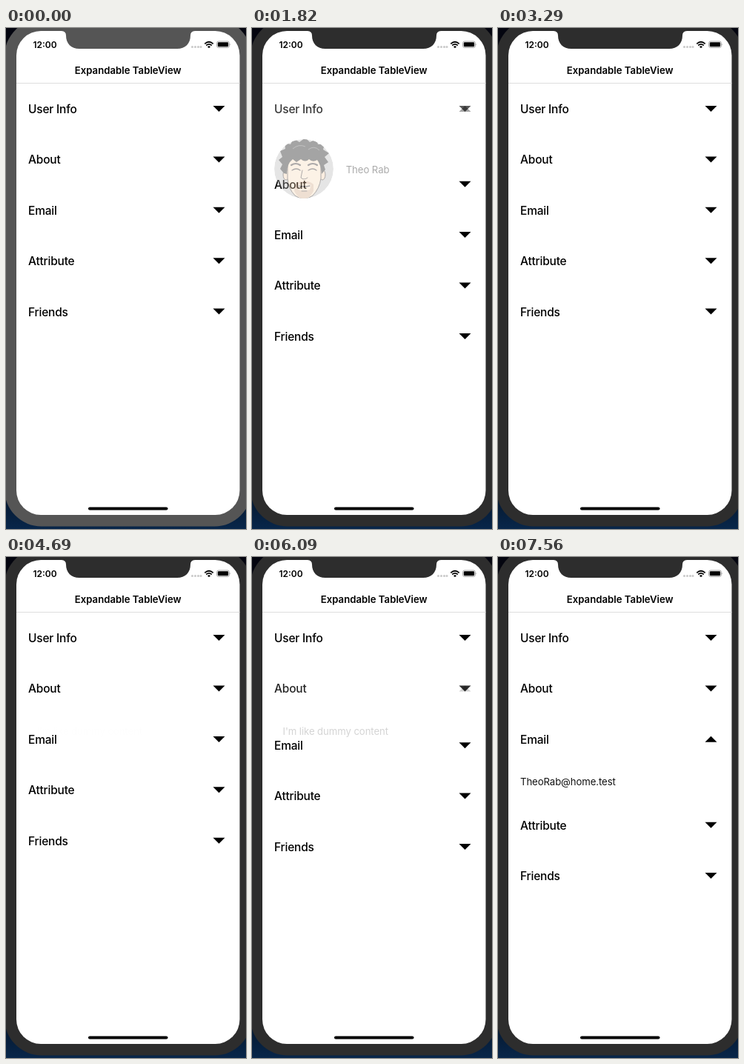
Animation, 324 px wide and 676 px high, one loop 8 s. Source, as an HTML page:

```html
<!DOCTYPE html>
<html lang="en">
<head>
<meta charset="utf-8">
<title>Expandable TableView</title>
<style>
  html, body { margin: 0; width: 100%; height: 100%; overflow: hidden; background: #050812; }
  svg { display: block; width: 324px; height: 676px; font-family: Inter, "Liberation Sans", sans-serif; }
  .title { font-size: 13.2px; font-weight: 600; text-anchor: middle; }
  .clock { font-size: 12px; font-weight: 600; text-anchor: middle; }
  .head { font-size: 15.5px; font-weight: 500; letter-spacing: -.2px; }
  .body { font-size: 13.2px; letter-spacing: -.1px; fill: #111; }
  .bezel { fill: #555; }
  .dim .bezel { fill: #2d2d2d; }
</style>
</head>
<body>
<svg id="stage" viewBox="0 0 324 676">
  <defs>
    <linearGradient id="sky" x2="0" y2="1">
      <stop offset="0" stop-color="#04050f"/>
      <stop offset=".9" stop-color="#03101f"/>
      <stop offset="1" stop-color="#08264a"/>
    </linearGradient>
    <clipPath id="disc"><circle cx="70" cy="190" r="40"/></clipPath>
  </defs>
  <rect width="324" height="676" fill="url(#sky)"/>
  <rect class="bezel" x="-2" y="-12" width="333.5" height="684.5" rx="50"/>
  <rect x="14" y="4" width="301.5" height="653" rx="33" fill="#fff"/>
  <path class="bezel" d="M75 3V4Q81 4.500 81 10C81 21 88 28 99 28H231C242 28 249 21 249 10Q249 4.500 255 4V3Z"/>

  <text class="clock" x="52.500" y="26.800">12:00</text>
  <g fill="#c9c9c9">
    <circle cx="251.500" cy="25.500" r="1.500"/><circle cx="255.500" cy="25.500" r="1.500"/>
    <circle cx="259.500" cy="25.500" r="1.500"/><circle cx="263" cy="25.500" r="1.500"/>
  </g>
  <g fill="none" stroke="#000" stroke-width="1.700">
    <path d="M268.300 21.300Q274 16.200 279.700 21.300"/>
    <path d="M270.300 23.500Q274 20.200 277.700 23.500"/>
  </g>
  <path d="M272 25.200Q274 23.500 276 25.200L274 27.200Z"/>
  <rect x="284.500" y="18" width="17" height="8.500" rx="2.500" fill="none" stroke="#999" stroke-width=".8"/>
  <rect x="285.800" y="19.300" width="14.400" height="5.900" rx="1.300"/>
  <path d="M302.500 20.800Q304 22.200 302.500 23.700Z" fill="#999"/>

  <text class="title" x="164.700" y="62">Expandable TableView</text>
  <rect x="14" y="74" width="301.500" height="1" fill="#dedede"/>
  <rect x="111" y="646.500" width="107.500" height="4" rx="2"/>

  <g id="rows"></g>

  <g class="panel">
    <g clip-path="url(#disc)">
      <circle cx="70" cy="190" r="40" fill="#b6b6b6"/>
      <g stroke="#1a1210" stroke-width="1">
        <ellipse cx="46" cy="198" rx="4" ry="7" fill="#f3cfa8"/>
        <ellipse cx="95" cy="198" rx="4" ry="7" fill="#f3cfa8"/>
        <path fill="#f8dcb9" d="M48 176Q70 164 93 176L93 203Q91 217 82 226Q70 235 58 226Q49 217 48 203Z"/>
      </g>
      <path d="M43 196L38 190L41 184L36 178L41 174L38 166L45 163L44 155L52 157L56 149L64 154L72 148L78 154L87 150L89 157L98 157L96 164L104 169L98 174L103 181L97 185L99 191L94 197Q93 184 88 178Q82 182 77 177Q72 182 66 177L60 181L55 177Q47 183 47 197Z"/>
      <path d="M55 163Q63 156 72 160M76 164Q84 158 91 165" fill="none" stroke="#555" stroke-width="1"/>
      <path fill="#d0a682" d="M58 211Q65 205 70 208Q76 205 83 211L83 220Q78 230 70 231Q62 230 57 220Z"/>
      <path fill="#f8dcb9" d="M61 212Q70 207 80 212L78 218Q70 221 62 218Z"/>
      <g fill="none" stroke="#1a1210" stroke-linecap="round">
        <path stroke-width="2.200" d="M53 185Q59 181 65 185M76 185Q82 181 88 185"/>
        <path stroke-width="1.300" d="M54 192Q60 188 65 192M76 192Q82 188 87 192M63 213Q70 215 78 213"/>
        <path stroke-width="1" d="M68 192L66 202Q70 206 75 202M67 220H74"/>
      </g>
    </g>
    <text class="body" x="126.700" y="195.500">Theo Rab</text>
  </g>
  <text class="panel body" x="41.500" y="240.300">I'm like dummy content</text>
  <text class="panel body" x="30" y="308.300">TheoRab@home.test</text>
</svg>
<script>
  const LOOP = 8000, TICK = 70, FADE = 300, DIM_AT = 1540;
  const FIRST_ROW = 109, PITCH = 68.4;
  const NAMES = ["User Info", "About", "Email", "Attribute", "Friends"];
  // One section per panel: opening time, closing time, panel height
  const SECTIONS = [
    { open: 1700, close: 2905, height: 94.6 },
    { open: 4680, close: 5870, height: 47.5 },
    { open: 7200, close: Infinity, height: 47.5 }
  ];

  const stage = document.getElementById("stage");
  const panels = [...document.querySelectorAll(".panel")];
  const rowsBox = document.getElementById("rows");

  const rows = NAMES.map(name => {
    const g = document.createElementNS("http://www.w3.org/2000/svg", "g");
    g.innerHTML = `<text class="head" x="30" y="5.900">${name}</text>
      <path d="M279.500 -4H295.500L287.500 4Z"/>
      <path d="M279.500 4H295.500L287.500 -4Z"/>`;
    rowsBox.append(g);
    const [label, down, up] = g.children;
    return { g, label, down, up };
  });

  function ease(t) {
    const p = Math.min(1, Math.max(0, t / FADE));
    return p * p * (3 - 2 * p);
  }

  function draw(time) {
    const t = Math.floor(time / TICK) * TICK;
    stage.classList.toggle("dim", t >= DIM_AT);
    let shift = 0;
    rows.forEach((row, i) => {
      const s = SECTIONS[i];
      const shown = s ? ease(t - s.open) - ease(t - s.close) : 0;
      row.g.setAttribute("transform", `translate(0 ${FIRST_ROW + i * PITCH + shift})`);
      row.label.style.opacity = 1 - shown * (1 - shown);
      row.down.style.opacity = 1 - shown;
      row.up.style.opacity = shown;
      if (s) {
        panels[i].style.opacity = shown;
        shift += s.height * shown;
      }
    });
  }

  function loop() {
    draw(performance.now() % LOOP);
    requestAnimationFrame(loop);
  }
  loop();
</script>
</body>
</html>
```
